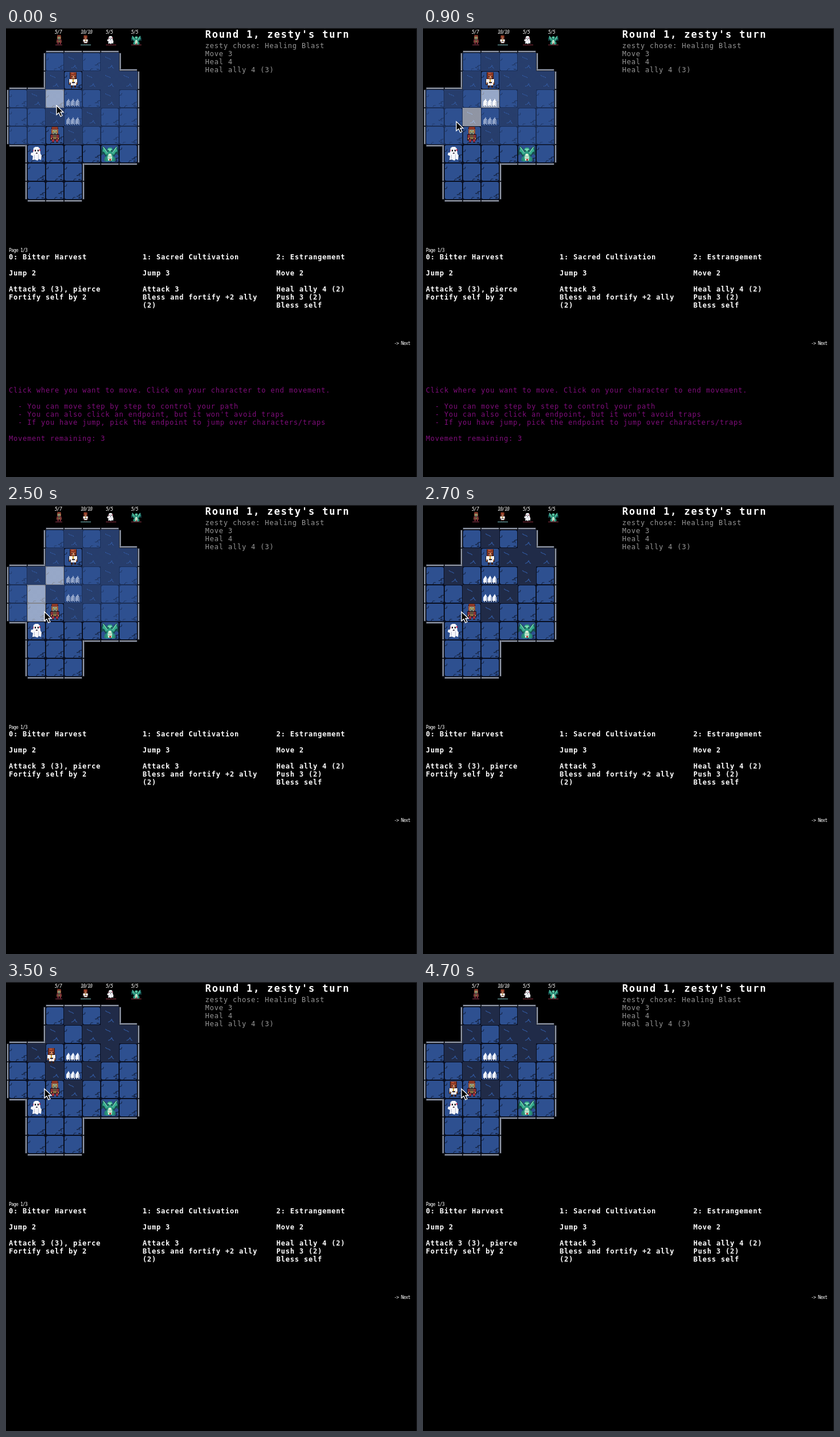
An HTML page with a canvas for the animation above (4.8 s loop, 716 by 782 pixels).

```html
<!DOCTYPE html>
<html lang="en">
<head>
<meta charset="utf-8">
<title>Dungeon turn</title>
<style>
html, body { margin: 0; width: 100%; height: 100%; overflow: hidden; background: #000; }
canvas, pre { position: absolute; margin: 0; }
canvas { left: 0; top: 0; }
pre { font: bold 12px/14px "DejaVu Sans Mono", monospace; letter-spacing: .776px; color: #fff; }
.title { font-size: 17px; line-height: 20px; letter-spacing: 1.77px; }
.log { color: #969696; font-weight: normal; }
.help { color: #800d7c; font-weight: normal; }
.small { font-size: 8px; line-height: 10px; letter-spacing: -.816px; font-weight: normal; }
.hp { font-style: italic; top: 3px; }
</style>
</head>
<body>
<canvas id="stage" width="716" height="782"></canvas>
<pre class="small hp" style="left:85px">5/7</pre>
<pre class="small hp" style="left:130px">10/10</pre>
<pre class="small hp" style="left:174px">5/5</pre>
<pre class="small hp" style="left:218px">5/5</pre>
<pre class="title" style="left:347px;top:1px">Round 1, zesty's turn</pre>
<pre class="log" style="left:347px;top:24px">zesty chose: Healing Blast
Move 3
Heal 4
Heal ally 4 (3)</pre>
<pre class="small" style="left:5px;top:383px">Page 1/3</pre>
<pre style="left:5px;top:392px">0: Bitter Harvest

Jump 2

Attack 3 (3), pierce
Fortify self by 2</pre>
<pre style="left:238px;top:392px">1: Sacred Cultivation

Jump 3

Attack 3
Bless and fortify +2 ally
(2)</pre>
<pre style="left:471px;top:392px">2: Estrangement

Move 2

Heal ally 4 (2)
Push 3 (2)
Bless self</pre>
<pre class="small" style="left:676px;top:545px">-> Next</pre>
<pre class="help" id="help" style="left:5px;top:624px">Click where you want to move. Click on your character to end movement.

  - You can move step by step to control your path
  - You can also click an endpoint, but it won't avoid traps
  - If you have jump, pick the endpoint to jump over characters/traps

Movement remaining: 3</pre>
<script>
const ctx = document.getElementById('stage').getContext('2d');
const help = document.getElementById('help');
const LOOP = 4800, CELL = 32, LEFT = 5, TOP = 43;

// '.' floor, '~' pit, '^' spikes
const MAP = [
  '  .~.~ ',
  '  ~.~~~',
  '.~.^.~.',
  '..~^~..',
  '...~...',
  ' ......',
  ' ...   ',
  ' ...   '
];
const cellAt = (r, c) => (MAP[r] || '')[c] || ' ';
const eachCell = fn => MAP.forEach((row, r) => [...row].forEach((kind, c) => {
  if (kind !== ' ') fn(kind, r, c, LEFT + c * CELL, TOP + r * CELL);
}));

function rect(color, x, y, w, h) {
  ctx.fillStyle = color;
  ctx.fillRect(x, y, w, h);
}

function trace(points, close) {
  ctx.beginPath();
  points.forEach(([x, y]) => ctx.lineTo(x, y));
  if (close) ctx.closePath();
}

function poly(color, ...points) {
  trace(points, true);
  ctx.fillStyle = color;
  ctx.fill();
}

function line(color, width, ...points) {
  trace(points);
  ctx.strokeStyle = color;
  ctx.lineWidth = width;
  ctx.stroke();
}

function at(x, y, draw, scale = 1) {
  ctx.save();
  ctx.translate(x, y);
  ctx.scale(scale, scale);
  draw();
  ctx.restore();
}

function checker(color) {
  const tile = document.createElement('canvas');
  tile.width = tile.height = 2;
  const g = tile.getContext('2d');
  g.fillStyle = color;
  g.fillRect(0, 0, 1, 1);
  g.fillRect(1, 1, 1, 1);
  return ctx.createPattern(tile, 'repeat');
}
const reachDots = checker('#2e5090'), pathDots = checker('#fff');

function floor(r, c) {
  let seed = r * 37 + c * 101 + 5;
  const rnd = n => (seed = (seed * 1103 + 12345) % 65536) / 65536 * n;
  rect('#090f20', 0, 0, 32, 32);
  ctx.fillStyle = '#2e5090';
  ctx.beginPath();
  ctx.roundRect(1, 1, 30, 30, 3);
  ctx.fill();
  const crack = '#182849';
  const y = 17 + rnd(7), x = 6 + rnd(12), top = 3 + rnd(5);
  line(crack, 1.4, [31, y], [27, y + 1], [25, y + 4], [22, y + 4]);
  line(crack, 1, [27, y + 1], [28, y + 6]);
  line(crack, 1.2, [x, 31], [x + 2, 28], [x + 5, 28]);
  line(crack, 1.2, [1, top + 6], [4, top + 5], [5, top + 2]);
  rect(crack, 25, 28, 4, 2);
}

function pit() {
  rect('#202b48', 0, 0, 32, 32);
  line('#31579b', 1.3, [8, 7], [11, 9], [14, 10], [17, 12]);
  line('#31579b', 1.3, [13, 27], [17, 25], [19, 22], [21, 26], [23, 27]);
}

function spikes() {
  rect('#1b2b50', 4, 27, 24, 3);
  for (let i = 0; i < 3; i++) {
    const x = 4 + i * 8;
    poly('#f4f7ff', [x, 28], [x, 22], [x + 4, 16], [x + 7, 22], [x + 7, 28]);
    line('#7d92bb', 1, [x + 5.5, 21], [x + 5.5, 28]);
    rect('#9aa6bf', x + 1, 28, 2, 2);
    rect('#9aa6bf', x + 5, 28, 2, 2);
  }
}

function walls(r, c, x, y) {
  const side = (wx, wy, w, h) => {
    rect('#3e4555', wx - .5, wy - .5, w + 1, h + 1);
    rect('#9299a8', wx, wy, w, h);
  };
  if (cellAt(r - 1, c) === ' ') side(x + 1, y - 3, 30, 2);
  if (cellAt(r + 1, c) === ' ') side(x + 1, y + 33, 30, 2);
  if (cellAt(r, c - 1) === ' ') side(x - 3, y + 1, 2, 30);
  if (cellAt(r, c + 1) === ' ') side(x + 33, y + 1, 2, 30);
}

// Sprites are drawn around the centre of their cell
function hero() {
  rect('#35130e', -6, -14, 12, 13);
  rect('#8e3b25', -5, -14, 10, 10);
  rect('#b9563a', -3, -13, 4, 2);
  rect('#c98460', -3, -8, 6, 5);
  rect('#30141a', -3, -7, 2, 2);
  rect('#30141a', 2, -7, 2, 2);
  rect('#7a2c1e', -5, -4, 3, 4);
  rect('#1b1b2c', -8, -2, 16, 10);
  rect('#f5f2ee', -7, -2, 14, 6);
  rect('#f5f2ee', -4, 2, 9, 7);
  rect('#b5744f', -7, 4, 2, 3);
  rect('#b5744f', 5, 4, 2, 3);
  rect('#d9a52d', -1, -2, 2, 5);
  rect('#2a2430', -2, 3, 5, 2);
  rect('#c9c4cf', 0, 5, 1, 4);
  rect('#3b211c', -4, 9, 3, 4);
  rect('#3b211c', 2, 9, 3, 4);
}

function ally() {
  rect('#32141a', -6, -14, 12, 14);
  rect('#8e3a28', -5, -15, 10, 5);
  rect('#9c4c34', -6, -11, 2, 8);
  rect('#9c4c34', 4, -11, 2, 8);
  rect('#87917c', -4, -10, 8, 8);
  rect('#d0b95c', -4, -8, 3, 3);
  rect('#d0b95c', 1, -8, 3, 3);
  rect('#26323b', -3, -7, 1, 2);
  rect('#26323b', 2, -7, 1, 2);
  rect('#4f5d56', -2, -4, 4, 2);
  rect('#28151f', -8, -2, 16, 11);
  rect('#8a3035', -7, -1, 14, 6);
  rect('#62543f', -3, -1, 6, 8);
  rect('#b57d4d', -7, 4, 2, 3);
  rect('#b57d4d', 5, 4, 2, 3);
  rect('#c69b48', -3, 4, 6, 1);
  rect('#a32d3d', -5, 7, 4, 5);
  rect('#a32d3d', 2, 7, 4, 5);
  rect('#33222c', -5, 11, 4, 2);
  rect('#33222c', 2, 11, 4, 2);
}

function ghost() {
  poly('#f7f7fb', [-5, -10], [-2, -12], [3, -12], [6, -9], [7, 0], [9, 3], [8, 11],
    [4, 9], [2, 12], [-3, 10], [-7, 11], [-6, 4], [-10, 2], [-9, -2], [-6, -2]);
  rect('#b9bfd5', -4, 2, 1, 7);
  rect('#b9bfd5', 3, 1, 1, 8);
  rect('#17161e', -3, -7, 2, 3);
  rect('#17161e', 2, -7, 2, 3);
  rect('#c92c54', 5, -8, 2, 3);
  rect('#c92c54', -6, -7, 1, 3);
  rect('#554a5d', -1, -2, 3, 2);
}

function dragon() {
  for (const s of [-1, 1]) {
    poly('#174f50', [s * 3, 2], [s * 6, -8], [s * 12, -14], [s * 15, -6], [s * 15, 3], [s * 11, 0], [s * 7, 5]);
    poly('#36ad8d', [s * 4, 0], [s * 7, -7], [s * 11, -12], [s * 13, -4], [s * 10, -3], [s * 7, 2]);
    line('#a6e2c5', 1, [s * 4, -1], [s * 8, -7], [s * 12, -12]);
    poly('#278774', [s * 3, 5], [s * 9, 6], [s * 10, 12], [s * 5, 14], [s * 2, 12]);
  }
  poly('#2c9a80', [-5, -8], [-2, -11], [3, -11], [5, -7], [4, -1], [7, 7], [6, 13], [-6, 13], [-7, 7], [-4, -1]);
  rect('#74d5ae', -3, -9, 6, 4);
  rect('#123c3c', -4, -6, 2, 2);
  rect('#123c3c', 2, -6, 2, 2);
  poly('#d8efd7', [-2, 0], [2, 0], [4, 6], [3, 12], [-3, 12], [-4, 6]);
  rect('#75b89e', -3, 4, 6, 1);
  rect('#75b89e', -3, 7, 6, 1);
  rect('#b62f36', -1, 9, 3, 3);
}

function cursor() {
  const shape = [[0, 0], [0, 16], [4, 12.5], [7, 19], [10, 17.5], [7, 11.5], [12, 11.5]];
  poly('#000', ...shape);
  trace(shape, true);
  ctx.lineWidth = 1.3;
  ctx.strokeStyle = '#fff';
  ctx.stroke();
}

// Keys are [time, x, y]
function follow(keys, t) {
  const i = keys.findIndex(k => k[0] > t);
  if (i < 0) return keys[keys.length - 1].slice(1);
  if (i === 0) return keys[0].slice(1);
  const [t0, x0, y0] = keys[i - 1], [t1, x1, y1] = keys[i];
  const p = (t - t0) / (t1 - t0);
  return [x0 + (x1 - x0) * p, y0 + (y1 - y0) * p];
}

const HERO_PATH = [
  [2700, 117, 91], [3200, 85, 123],
  [3400, 85, 123], [3900, 53, 155],
  [4100, 53, 155], [4600, 53, 187]
];
const MOUSE_PATH = [
  [0, 88, 135], [500, 88, 135], [700, 82, 150], [800, 72, 162],
  [900, 58, 163], [1200, 55, 166], [1600, 67, 186]
];

function hoverPath(t) {
  if (t < 700) return [[2, 2]];
  if (t < 1000) return [[2, 3], [3, 2]];
  if (t < 1400) return [[2, 2], [3, 1]];
  return [[2, 2], [3, 1], [4, 1]];
}

const ICONS = [
  [92.5, ally, '#8d3548', 86], [138.5, hero, '#78bfc2', 130],
  [182, ghost, '#8d3040', 174], [227, dragon, '#8d3040', 218]
];

function draw(t) {
  rect('#000', 0, 0, 716, 782);
  rect('#2b2d33', 0, 0, 716, 1);
  rect('#1c1d21', 715, 0, 1, 782);

  eachCell((kind, r, c, x, y) => at(x, y, () => {
    if (kind === '~') pit();
    else floor(r, c);
    if (kind === '^') spikes();
  }));
  eachCell((kind, r, c, x, y) => walls(r, c, x, y));

  if (t < 2600) {
    const path = hoverPath(t);
    eachCell((kind, r, c, x, y) => {
      const taken = r === 1 && c === 3 || r === 4 && c === 2;
      if (r > 4 || taken) return;
      const onPath = path.some(p => p[0] === r && p[1] === c);
      rect(reachDots, x, y, CELL, CELL);
      if (onPath) rect(pathDots, x, y, CELL, CELL);
    });
  }

  at(85, 187, ally);
  at(53, 219, ghost);
  at(181, 219, dragon);
  const [hx, hy] = follow(HERO_PATH, t);
  at(Math.round(hx), Math.round(hy), hero);

  for (const [x, sprite, color, bar] of ICONS) {
    at(x, 21, sprite, .58);
    rect(color, bar, 29, bar === 86 ? 12 : 18, 1);
  }

  const [mx, my] = follow(MOUSE_PATH, t);
  at(mx, my, cursor);
  help.style.visibility = t < 2200 ? 'visible' : 'hidden';
}

const start = performance.now();
function tick() {
  draw((performance.now() - start) % LOOP);
  requestAnimationFrame(tick);
}
tick();
</script>
</body>
</html>
```
